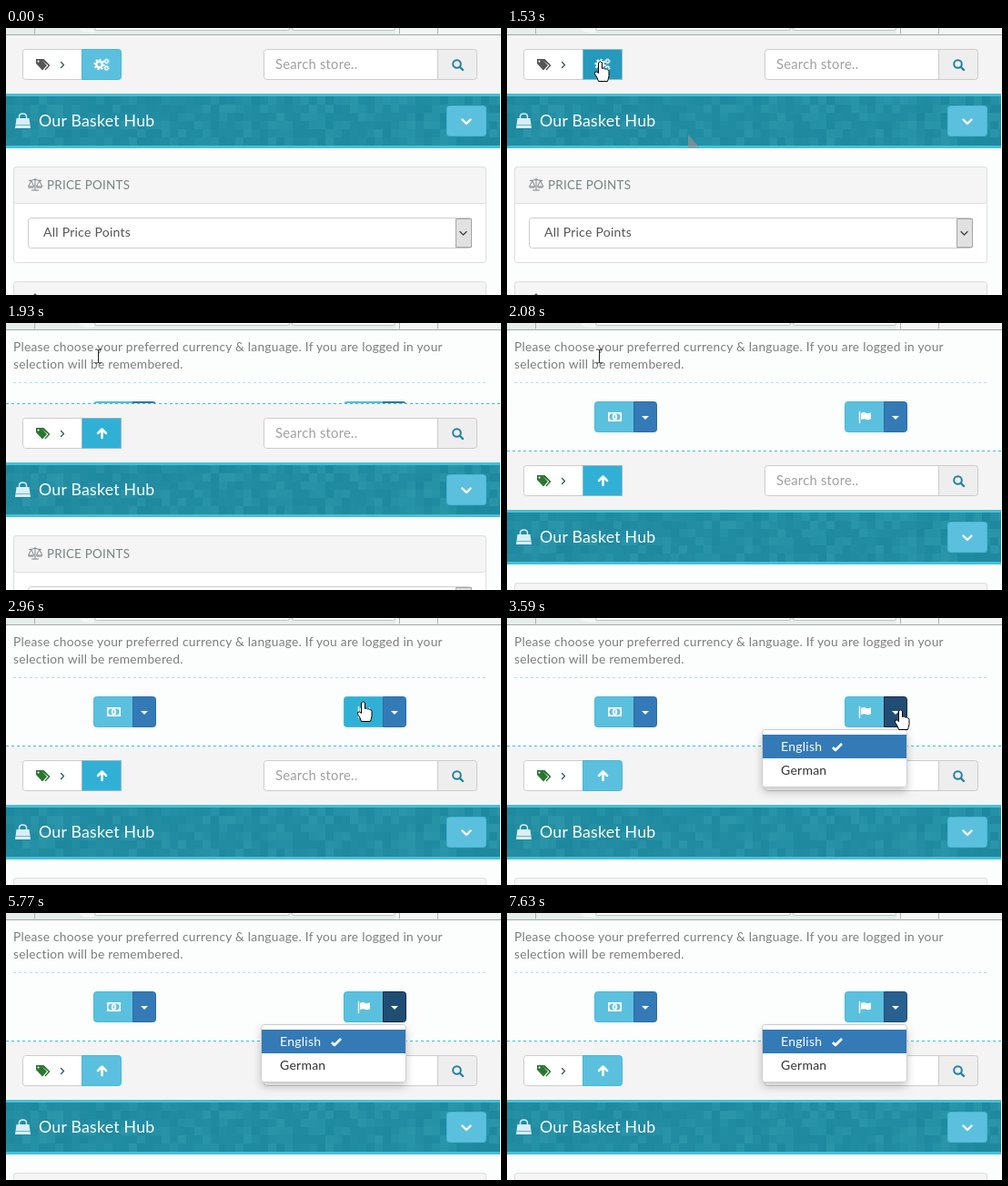
An HTML page that plays this animation: 544x293 px, repeating every 7790 ms.

```html
<!DOCTYPE html>
<html lang="en">
<head>
<meta charset="utf-8">
<title>Store settings drawer</title>
<style>
html, body { margin: 0; width: 100%; height: 100%; overflow: hidden; background: #fcfdfd; }
svg { display: block; width: 100vw; height: 100vh; }
text { font: 14px Lato, "Open Sans", sans-serif; letter-spacing: .25px; white-space: pre; }
.line { fill: none; stroke-linecap: round; stroke-linejoin: round; }
</style>
</head>
<body>
<svg id="stage" viewBox="0 0 544 293"></svg>
<script>
const LOOP = 7790, DRAWER = 133;
const SKY = '#5bc0de', SKY_EDGE = '#46b8da', SKY_HOVER = '#31b0d5', SKY_DOWN = '#269abc';
const BLUE = '#337ab7', BLUE_EDGE = '#2e6da4', BLUE_HOVER = '#286090', BLUE_DOWN = '#204d74', NAVY = '#122b40';

// Bordered box; left and right corner radii may differ.
function box(x, y, w, h, fill, edge, l = 3, r = l, id = '') {
  x += .5; y += .5; w--; h--;
  return `<path id="${id}" fill="${fill}" stroke="${edge}" d="M${x + l} ${y}H${x + w - r}q${r} 0 ${r} ${r}V${y + h - r}
    q0 ${r} ${-r} ${r}H${x + l}q${-l} 0 ${-l} ${-l}V${y + l}q0 ${-l} ${l} ${-l}z"/>`;
}
const rect = (x, y, w, h, fill, more = '') =>
  `<rect x="${x}" y="${y}" width="${w}" height="${h}" fill="${fill}" ${more}/>`;
const label = (x, y, s, fill, size = 14) =>
  `<text x="${x}" y="${y}" fill="${fill}" style="font-size:${size}px">${s}</text>`;
const line = (d, color, width = 1, more = '') =>
  `<path class="line" d="${d}" stroke="${color}" stroke-width="${width}" ${more}/>`;
const shape = (d, fill, more = '') => `<path d="${d}" fill="${fill}" ${more}/>`;
const dashes = (y, color, x0, x1) =>
  `<path d="M${x0} ${y}H${x1}" stroke="${color}" stroke-dasharray="3 3"/>`;

function gear(x, y, r) {
  return `<g fill="none" stroke="#fff"><circle cx="${x}" cy="${y}" r="${r * .6}" stroke-width="${r * .45}"/>
    <circle cx="${x}" cy="${y}" r="${r * .95}" stroke-width="${r * .35}" pathLength="16" stroke-dasharray="1 1"/></g>`;
}

function texture() {
  let seed = 11, out = '';
  const random = () => (seed = seed * 16807 % 2147483647) / 2147483647;
  for (let y = 75; y < 129; y += 9)
    for (let x = 0; x < 543; x += 9) {
      const v = random() - .5;
      out += rect(x, y, Math.min(9, 543 - x), 9, v > 0 ? '#5cc4d2' : '#0b6f8c',
        `opacity="${(Math.abs(v) * .3).toFixed(2)}"`);
    }
  return out;
}

function splitButton(x, icon, id) {
  return box(x, 86, 44, 34, SKY, SKY_EDGE, 3, 0, id) +
    box(x + 43, 86, 26, 34, BLUE, BLUE_EDGE, 0, 3, id + 'Caret') +
    shape(`M${x + 52} 102h8l-4 4z`, '#fff') + icon;
}

const money = rect(111, 98, 15, 10, '#fff') + rect(112.5, 99.5, 12, 7, SKY) +
  '<ellipse cx="118.5" cy="103" rx="2.800" ry="3.5" fill="#fff"/>' + line('M118.5 101.5v3', SKY) +
  shape('M112 99h3l-3 3zM125 99h-3l3 3zM112 107h3l-3-3zM125 107h-3l3-3z', '#fff');
const flag = line('M387.5 97.5v12', '#fff', 1.4) +
  shape('M389 99q3-2 6 0 2 1 5-.8v7q-3 2-6 .4-2-1-5 .7z', '#fff');

const drawer =
  label(8, 31, 'Please choose your preferred currency &amp; language. If you are logged in your', '#7d7d7d', 13.75) +
  label(8, 50, 'selection will be remembered.', '#7d7d7d', 13.75) +
  dashes(65.5, '#b5e3e8', 8, 528) +
  splitButton(96, money, 'money') + splitButton(371, flag, 'flag');

const focusRing = color => `<rect x="83.5" y="23.5" width="43" height="33" fill="none" stroke="${color}"/>`;

const toolbar = rect(0, 8, 544, 64, '#f4f4f4') + dashes(7.5, '#35c4d8', 0, 544) +
  box(18, 23, 67, 34, '#fff', '#ccc', 3, 0) +
  `<g id="tags">${shape('M37 34h4.500l7 7-5 5.500-1-1 4-4.500z', 'currentColor')}
    ${shape('M33 34h5l7 7-5 5.500-7-7.500zM35.500 35.500a1 1 0 1 0 .1 0z', 'currentColor', 'fill-rule="evenodd"')}</g>` +
  line('M60.500 37.500l3 3-3 3', '#2d5c66', 1.4) +
  box(83, 23, 44, 34, SKY, SKY_EDGE, 0, 3, 'gearButton') +
  `<g id="focus">${focusRing('#1d7697')}<g stroke-dasharray="1 1">${focusRing('#fff')}</g></g>` +
  `<g id="gears">${gear(102.5, 40, 5.5)}${gear(110.5, 36.5, 2.8)}${gear(110.5, 44, 2.8)}</g>` +
  `<g id="up">${line('M105.500 45V36M101 40l4.500-4.500 4.500 4.500', '#fff', 2.5)}</g>` +
  box(283, 23, 192, 34, '#fff', '#ccc', 3, 0) + label(296, 45, 'Search store..', '#a0a0a0', 14.75) +
  box(474, 23, 44, 34, '#eee', '#ccc', 0, 3) +
  '<circle cx="495.500" cy="39.500" r="4.300" fill="none" stroke="#24809f" stroke-width="2"/>' +
  line('M499 43l3 3', '#24809f', 2.4);

const banner = rect(0, 72, 543, 60, '#46c1d6') + rect(0, 75, 543, 54, '#228da2') + texture() +
  shape('M11.500 99h14l1.500 11h-17z', '#d9eef5') +
  line('M14.500 102v-4.500q0-3.500 4-3.500t4 3.500v4.500', '#d9eef5', 1.4) + line('M10.500 106.500h16', '#6fb5c6') +
  label(36, 108, 'Our Basket Hub', '#fff', 17.7) +
  box(484, 85, 44, 34, SKY, SKY_EDGE, 3, 3, 'more') +
  line('M501.500 100.500l4.500 4.500 4.500-4.500', '#fff', 2.4) +
  `<g id="ghost">${shape('M199 117v15h13z', '#9b9494', 'opacity=".65"')}</g>`;

const panels = box(8, 152, 520, 106, '#fff', '#ddd') + box(8, 152, 520, 41, '#f5f5f5', '#ddd') +
  line('M32 165.500v12M28.500 178h7M25.500 167.500q4 0 6.500-1.500 2.500 1.500 6.500 1.500M27.500 168l-3 6h6zM36.500 168l-3 6h6zM25 175h5M34 175h5', '#7c8285') +
  label(45, 176.5, 'PRICE POINTS', '#7a8383', 13.4) +
  box(24, 208, 488, 34, '#fff', '#ccc') + label(41, 229, 'All Price Points', '#555') +
  box(494, 209, 18, 32, '#e1e1e1', '#a5a5a5', 0) + line('M499 223.500l3.500 3.500 3.500-3.500', '#444', 1.3) +
  box(8, 278, 520, 60, '#f5f5f5', '#ddd') + shape('M30 293l2-2 2 2z', '#666');

const menu = '<g id="menu">' +
  '<g style="filter:drop-shadow(0 5px 5px rgba(0,0,0,.2))">' + box(280, 122, 160, 64, '#fff', '#ccc') + '</g>' +
  rect(281, 128, 158, 26, BLUE) + label(301, 146, 'English', '#fff') +
  line('M358 142l3 3 7-7', '#fff', 2.8, 'style="stroke-linecap:butt"') +
  label(301, 172, 'German', '#333') + '</g>';

const chrome = rect(0, 0, 544, 8, '#e5eeea') + rect(428, 0, 116, 8, '#f3f5f5') +
  shape('M80 0q2 5 14 5h3V0z', '#f2f7f5') +
  box(97, -6, 215, 9, '#fbfdfc', '#b9c4c0', 2) + box(314, -6, 114, 9, '#fbfdfc', '#b9c4c0', 2) +
  line('M31.500 0v6M432.500 0v6M474.500 0v6', '#a9b3b0') + rect(0, 7, 544, 1, '#a3a9a8');

const ink = 'stroke="#000" stroke-linejoin="round"';
const cursors =
  shape('M0 0V16.500L3.800 13L6.500 19L8.800 18L6.300 12.300H11.500Z', '#fff', ink + ' id="arrow"') +
  shape('M-2 1.500Q0-1 2 1.500V8Q4 6.500 5 8.500 7 7.500 8 9.500 9.500 9 9.500 11V16Q9 19 8 22H-2Q-3 18-6 14-7 11-4 11.500L-2 13Z',
    '#fff', ink + ' id="hand"') +
  line('M-3-7.500h2l1 1 1-1h2M0-6.500V6.500M-3 7.500h2l1-1 1 1h2', '#222', 1, 'id="beam"');

const $ = id => document.getElementById(id);
$('stage').innerHTML = drawer +
  `<g id="page">${rect(0, 7, 544, 330, '#fcfdfd')}${toolbar}${banner}${panels}</g>` +
  menu + chrome + `<g id="cursor">${cursors}</g>`;

// Pointer moves: first and last step time, step count, start and end point.
const moves = [
  [450, 530, 2, 358, 245, 259, 167],
  [840, 1230, 6, 259, 167, 102, 36],
  [2160, 2470, 5, 102, 36, 322, 74],
  [2720, 3200, 7, 322, 74, 432, 100],
  [5230, 5770, 8, 432, 100, 530, 293]
];
const stepAt = (t, start, end, n) => Math.floor((t - start) / (end - start) * (n - 1) + .05);

function pointer(t) {
  const move = moves.filter(m => m[0] <= t).pop();
  if (!move) return [-50, -50];
  const [start, end, n, x0, y0, x1, y1] = move;
  const p = Math.min(1, (stepAt(t, start, end, n) + 1) / n);
  const e = 1 - (1 - p) ** 1.2;
  return [Math.round(x0 + (x1 - x0) * e), Math.round(y0 + (y1 - y0) * e)];
}

function slide(t) {
  if (t < 1770) return 0;
  const p = Math.min(1, (44 + 77.8 * stepAt(t, 1770, 2470, 10)) / 350);
  return Math.round(DRAWER * (.5 - Math.cos(Math.PI * p) / 2));
}

const show = (id, on) => $(id).style.display = on ? '' : 'none';
const move = (id, x, y) => $(id).setAttribute('transform', `translate(${x} ${y})`);
function paint(id, fill, edge) {
  $(id).setAttribute('fill', fill);
  $(id).setAttribute('stroke', edge);
}

function draw(t) {
  const d = slide(t), [x, y] = pointer(t);
  const over = (left, top, w) => x >= left && x < left + w && y >= top && y < top + 34;
  const onGear = over(83, 23 + d, 44), onMore = over(484, 85 + d, 44);
  const open = d === DRAWER, onFlag = open && over(371, 86, 43), onCaret = open && over(414, 86, 26);
  const focused = t >= 1530 && t < 3360;
  const pressed = t >= 3360 && t < 7630;

  move('page', 0, d);
  show('gears', t < 1770);
  show('up', t >= 1770);
  show('focus', focused);
  show('ghost', t >= 920 && t < 1770);
  show('menu', t >= 3590);
  $('tags').setAttribute('color', t < 1770 ? '#555' : '#2a7630');
  paint('gearButton', t >= 1530 && t < 1770 ? SKY_DOWN : focused || onGear ? SKY_HOVER : SKY, SKY_EDGE);
  paint('flag', onFlag ? SKY_HOVER : SKY, SKY_EDGE);
  paint('more', onMore ? SKY_HOVER : SKY, SKY_EDGE);
  if (pressed) paint('flagCaret', BLUE_DOWN, NAVY);
  else if (onCaret || t >= 7630) paint('flagCaret', BLUE_HOVER, BLUE_DOWN);
  else paint('flagCaret', BLUE, BLUE_EDGE);

  const hand = onGear || onMore || onFlag || onCaret;
  const beam = !hand && y > 20 && y < 56 && y < d + 7;
  move('cursor', x + (beam ? -.5 : .5), y + .5);
  show('hand', hand);
  show('beam', beam);
  show('arrow', !hand && !beam);
}

const began = performance.now();
function tick() {
  draw((performance.now() - began) % LOOP);
  requestAnimationFrame(tick);
}
tick();
</script>
</body>
</html>
```
